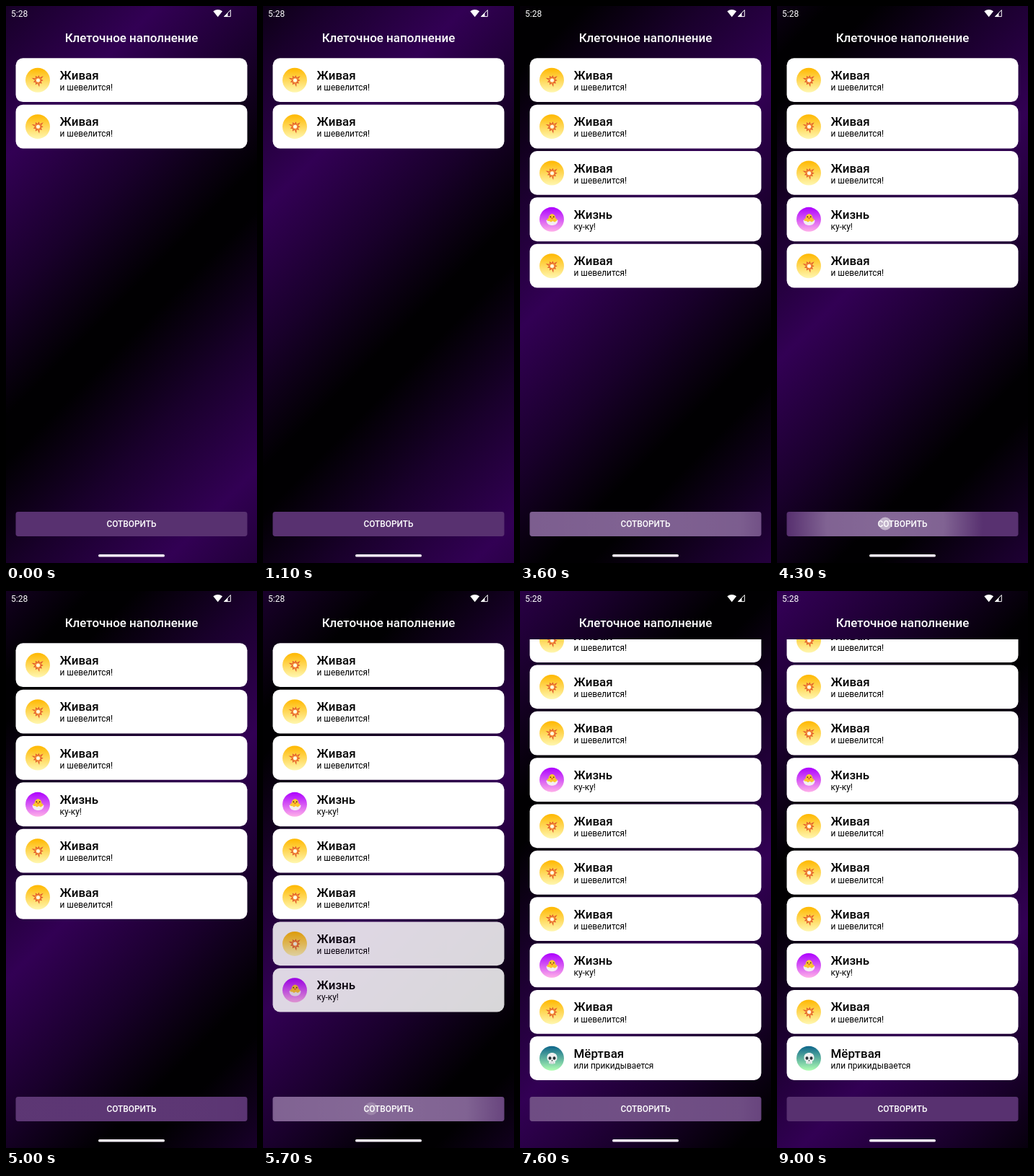
These frames come from a looping animation (348 by 772 pixels, 9100 ms). An HTML page:

```html
<!DOCTYPE html>
<html lang="ru">
<head>
<meta charset="utf-8">
<title>Клеточное наполнение</title>
<style>
  html, body { margin: 0; width: 100%; height: 100%; overflow: hidden; background: #000; }
  svg { display: block; font-family: Roboto, sans-serif; }
  .title { font-size: 16.94px; font-weight: 500; }
  .note { font-size: 11.86px; }
  .label { font-size: 11.86px; font-weight: 500; }
</style>
</head>
<body>
<svg width="348" height="772" viewBox="0 0 348 772">
  <defs>
    <linearGradient id="sky" gradientUnits="userSpaceOnUse" x1="0" y1="0" x2="390" y2="390" spreadMethod="repeat">
      <stop offset="0" stop-color="#320054"/>
      <stop offset=".25" stop-color="#19002b"/>
      <stop offset=".46" stop-color="#010002"/>
      <stop offset=".54" stop-color="#010002"/>
      <stop offset=".75" stop-color="#19002b"/>
      <stop offset="1" stop-color="#320054"/>
    </linearGradient>
    <linearGradient id="aliveFill" x2="0" y2="1">
      <stop stop-color="#ffb800"/><stop offset="1" stop-color="#fff7b0"/>
    </linearGradient>
    <linearGradient id="lifeFill" x2="0" y2="1">
      <stop stop-color="#ad00ff"/><stop offset="1" stop-color="#ffb0e9"/>
    </linearGradient>
    <linearGradient id="deadFill" x2="0" y2="1">
      <stop stop-color="#0d658a"/><stop offset="1" stop-color="#b0ffb4"/>
    </linearGradient>
    <radialGradient id="glow">
      <stop stop-color="#fff"/><stop offset=".6" stop-color="#fff" stop-opacity=".9"/>
      <stop offset="1" stop-color="#fff" stop-opacity="0"/>
    </radialGradient>
    <clipPath id="listArea"><path d="M0 67H348V682H0Z"/></clipPath>
    <clipPath id="buttonArea"><rect x="13.5" y="701" width="321" height="34" rx="3.4"/></clipPath>

    <g id="alive">
      <path id="burst" fill="#de4f2c"/>
      <path id="flame" fill="#fba33c"/>
      <circle r="2.5" fill="#fff8e0"/>
    </g>
    <g id="life">
      <path d="M-8 1.5C-8 -1 8 -1 8 1.5C7.500 6 4 8 0 8S-7.500 6 -8 1.500Z" fill="#f3eef2"/>
      <path d="M-6 2C-8 0 -6.500 -2 -5 -1C-5 -10 5 -10 5 -1C6.500 -2 8 0 6 2L3.500 3.500L1 2L-1.500 3.500L-4 2Z" fill="#fcc62e"/>
      <circle cx="-2.200" cy="-3.800" r=".9" fill="#4a2a18"/>
      <circle cx="2.200" cy="-3.800" r=".9" fill="#4a2a18"/>
      <path d="M-1.800 -2L0 -3L1.800 -2L0 -.2Z" fill="#ef6a22"/>
    </g>
    <g id="dead">
      <path d="M-7 -1.500C-7 -10 7 -10 7 -1.500C7 1.500 6 3 4.300 3.500V6.500C3 8 -3 8 -4.300 6.500V3.500C-6 3 -7 1.500 -7 -1.500Z" fill="#eef0f0"/>
      <ellipse cx="-3" cy="-.5" rx="2" ry="2.300" fill="#29343a"/>
      <ellipse cx="3" cy="-.5" rx="2" ry="2.300" fill="#29343a"/>
      <path d="M0 1.500L1.200 3.500H-1.200Z" fill="#29343a"/>
      <path d="M-1.500 5V7.300M1.500 5V7.300" stroke="#8d979b" stroke-width=".6"/>
    </g>
  </defs>

  <rect width="348" height="772" fill="url(#sky)"/>

  <g fill="#fff">
    <text x="7" y="15" font-size="12">5:28</text>
    <path d="M287.300 7.300Q293.700 2.700 300.100 7.300L293.700 15.200Z"/>
    <path d="M302.500 14.600L311.300 5.600V14.600Z" fill="none" stroke="#fff"/>
    <path d="M302 15L307.500 9.500V15Z"/>
    <text class="title" x="174" y="49.500" text-anchor="middle">Клеточное наполнение</text>
  </g>

  <g clip-path="url(#listArea)"><g id="list"></g></g>

  <g clip-path="url(#buttonArea)">
    <path d="M13 700H335V736H13Z" fill="#583170"/>
    <g id="ripples"></g>
  </g>
  <text class="label" x="174" y="722.300" text-anchor="middle" fill="#fff">СОТВОРИТЬ</text>
  <g id="dots"></g>
  <rect x="128" y="760" width="92" height="3.600" rx="1.800" fill="#fbf3fd"/>
</svg>

<script>
const LOOP = 9100, PITCH = 64.35, RELEASE = 220;
const presses = [2000, 3100, 4150, 5380, 6400, 6950];
const kinds = {
  alive: ['Живая', 'и шевелится!'],
  life: ['Жизнь', 'ку-ку!'],
  dead: ['Мёртвая', 'или прикидывается']
};
// Each cell: its kind and the press that creates it (-1 = already there).
const cells = [
  ['alive', -1], ['alive', -1], ['alive', 0], ['life', 0], ['alive', 1],
  ['alive', 2], ['alive', 3], ['life', 3], ['alive', 4], ['dead', 5]
];

const $ = id => document.getElementById(id);
const clamp = v => Math.max(0, Math.min(1, v));
const easeOut = v => 1 - (1 - clamp(v)) ** 3;

function star(spikes, outer, inner) {
  let d = '';
  for (let i = 0; i < spikes * 2; i++) {
    const a = i * Math.PI / spikes - 0.7;
    const r = i % 2 ? inner : outer * (0.84 + 0.16 * Math.cos(i * 2.1));
    d += `${i ? 'L' : 'M'}${(r * Math.cos(a)).toFixed(2)} ${(r * Math.sin(a)).toFixed(2)}`;
  }
  return d + 'Z';
}
$('burst').setAttribute('d', star(9, 9.5, 4.2));
$('flame').setAttribute('d', star(9, 6.3, 3));

$('list').innerHTML = cells.map(([kind], i) => `
  <g transform="translate(0 ${72.3 + i * PITCH})">
    <rect x="13.5" width="321" height="60.8" rx="10" fill="#fff"/>
    <circle cx="44" cy="30.500" r="17" fill="url(#${kind}Fill)"/>
    <use href="#${kind}" x="44.500" y="30.700"/>
    <text class="title" x="74.500" y="29.500">${kinds[kind][0]}</text>
    <text class="note" x="74.500" y="44.700">${kinds[kind][1]}</text>
  </g>`).join('');
const circles = fill => presses.map(() => `<circle cx="150" cy="717.500" r="9" fill="${fill}"/>`).join('');
$('ripples').innerHTML = circles('url(#glow)');
$('dots').innerHTML = circles('#fff');

const cards = [...$('list').children];
const ripples = [...$('ripples').children];
const dots = [...$('dots').children];

function draw(t) {
  const shift = (210 + 0.066 * t) / 2;
  $('sky').setAttribute('gradientTransform', `translate(${shift} ${shift})`);

  cells.forEach(([, press], i) => {
    const shown = press < 0 ? 1 : clamp((t - presses[press] - RELEASE) / 120);
    cards[i].setAttribute('opacity', shown);
  });
  const scroll = 34.2 * easeOut((t - 7250) / 350);
  $('list').setAttribute('transform', `translate(0 ${-scroll})`);

  presses.forEach((press, i) => {
    const age = t - press;
    ripples[i].setAttribute('r', 60 + 200 * clamp(age / 400));
    ripples[i].setAttribute('opacity', 0.27 * clamp(age / 75) * clamp((900 - age) / 450));
    dots[i].setAttribute('opacity', age < 0 ? 0 : 0.5 * clamp((400 - age) / 200));
  });
}

const start = performance.now();
(function tick() {
  draw((performance.now() - start) % LOOP);
  requestAnimationFrame(tick);
})();
</script>
</body>
</html>
```
